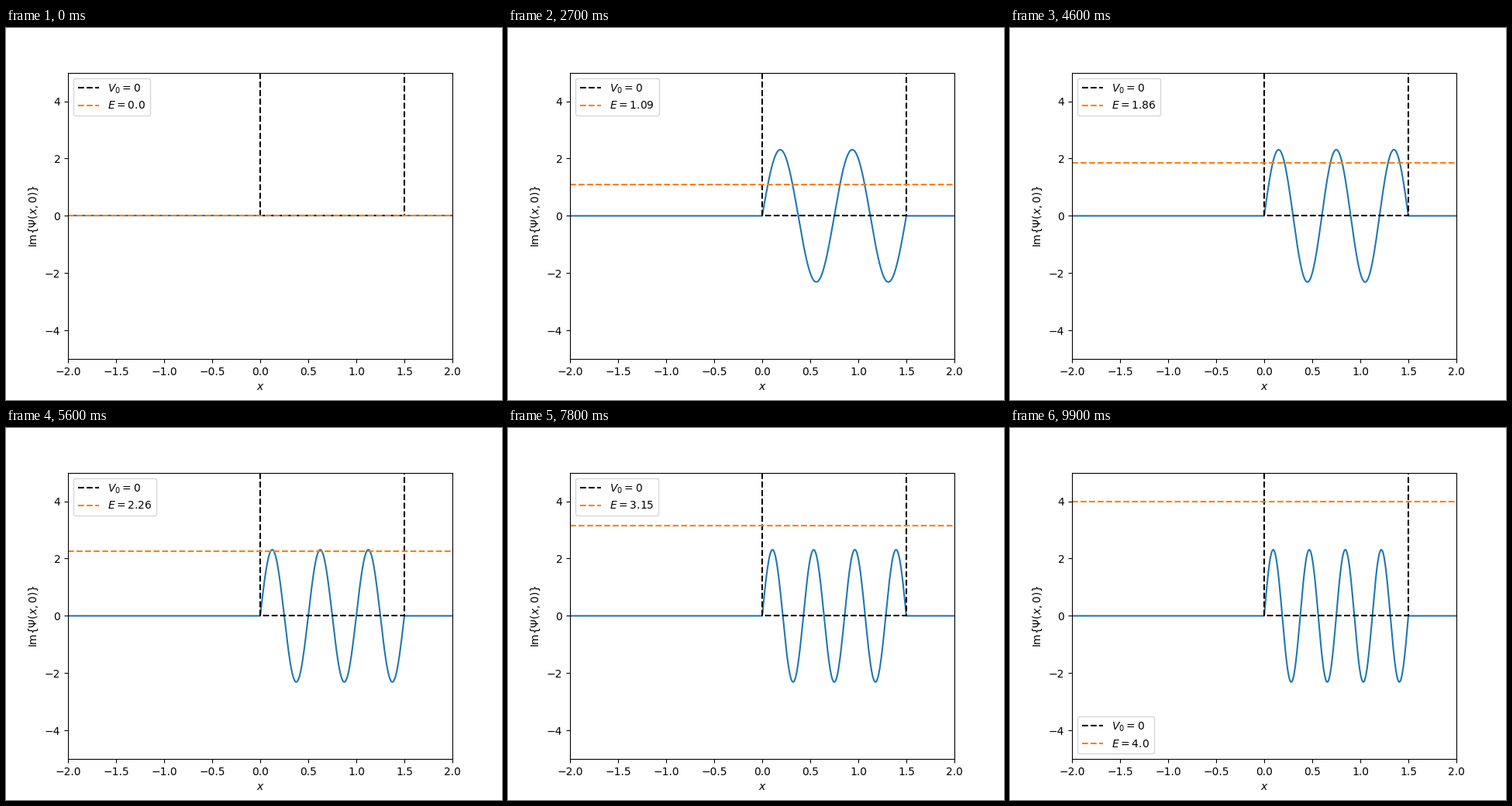
Write a matplotlib script that moves like this. It is 640x480 px and loops after 10 s.

```python
import numpy as np
import matplotlib.pyplot as plt
from matplotlib.animation import FuncAnimation

FRAMES = 100
L = 1.5      # well width
Y_MAX = 5

x = np.linspace(-2, 2, 1000)
energies = np.linspace(0, 4, FRAMES)


def level(energy):
    """Highest n with n^2 h^2 / (8 m L^2) <= energy, for h = m = 1."""
    return int(np.sqrt(8 * L**2 * energy) + 1e-9)


def psi(n):
    inside = (x >= 0) & (x <= L)
    return np.where(inside, 2 * np.sqrt(2 / L) * np.sin(n * np.pi * x / L), 0)


fig, ax = plt.subplots(figsize=(6.4, 4.8), dpi=100)
ax.set_xlim(-2, 2)
ax.set_ylim(-Y_MAX, Y_MAX)
ax.set_xlabel("$x$")
ax.set_ylabel(r"Im$\{\Psi(x,0)\}$")

wave, = ax.plot(x, psi(0), color="C0")
ax.plot([0, 0, L, L], [Y_MAX, 0, 0, Y_MAX], "k--", label="$V_0=0$")
line, = ax.plot([-2, 2], [0, 0], "--", color="C1")


def update(i):
    energy = energies[i]
    wave.set_ydata(psi(level(energy)))
    line.set_ydata([energy, energy])
    line.set_label(f"$E={round(float(energy), 2)}$")
    ax.legend(loc="best")


anim = FuncAnimation(fig, update, frames=FRAMES, interval=100,
                     init_func=lambda: update(0), repeat=True)
plt.show()
```
